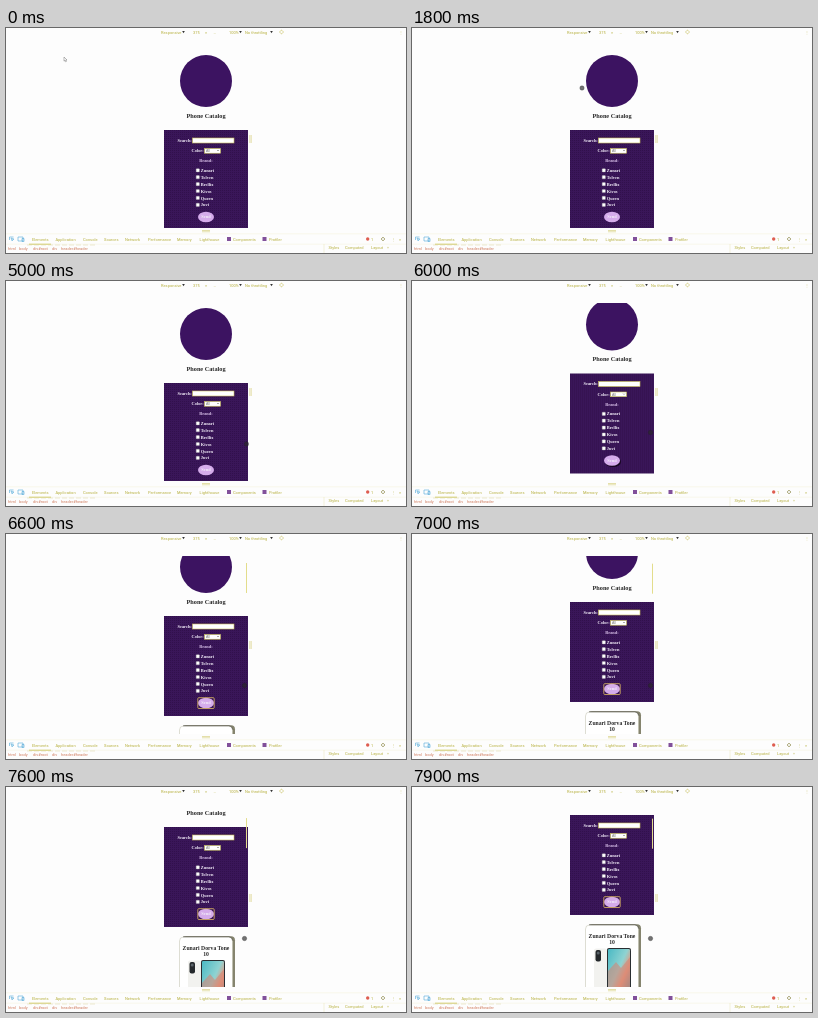
An HTML page for the animation above (8000 ms loop, 400 px wide and 225 px high).

```html
<!DOCTYPE html>
<html lang="en">
<head>
<meta charset="utf-8">
<title>Phone Catalog</title>
<style>
html, body { margin: 0; width: 100%; height: 100%; overflow: hidden; background: #fdfdfd }
svg { display: block; width: 100vw; height: 100vh }
text { white-space: pre }
.ui { font: 4px Roboto, Arial, sans-serif; fill: #b5ae3a }
.tag { fill: #cf7a5c }
.page { font: bold 4.4px "Liberation Serif", Times, serif; fill: #f4eefa }
.mid { text-anchor: middle }
.dark { fill: #292929 }
.h1 { font-size: 6.25px }
.h2 { font-size: 5.7px }
</style>
</head>
<body>
<svg viewBox="0 0 400 225">
  <defs>
    <clipPath id="view"><rect x="158" y="22" width="84" height="178"/></clipPath>
    <clipPath id="card"><rect x="173.5" y="212" width="53" height="90" rx="4"/></clipPath>
    <pattern id="grain" width="2" height="2" patternUnits="userSpaceOnUse">
      <rect width="2" height="2" fill="#3a1659"/><rect width="1" height="1" fill="#31104c"/>
    </pattern>
    <linearGradient id="screen" x2="1" y2="1">
      <stop stop-color="#4ab9c4"/><stop offset=".45" stop-color="#8fd3d2"/>
      <stop offset=".65" stop-color="#e59a80"/><stop offset="1" stop-color="#3a8fa5"/>
    </linearGradient>
  </defs>
  <g id="tools"></g>
  <g clip-path="url(#view)">
    <g id="page" class="page"></g>
    <path id="thumb" d="M240.5 28v30" stroke="#e3dd8c"/>
  </g>
  <path id="arrow" d="M-1-2v4.2l1-.9.7 1.5.7-.4-.7-1.4h1.3z" fill="#fff" stroke="#777" stroke-width=".5"/>
  <circle id="touch" r="2.2" fill="#292929" fill-opacity=".65" stroke="#222" stroke-opacity=".6" stroke-width=".5"/>
</svg>
<script>
const $ = id => document.getElementById(id);
const text = (x, y, s, cls = '') => `<text x="${x}" y="${y}" class="${cls}">${s}</text>`;
const box = (x, y, w, h, fill, more = '') =>
  `<rect x="${x}" y="${y}" width="${w}" height="${h}" fill="${fill}" ${more}/>`;
const row = (y, items, cls) => items.map(([x, s]) => text(x, y, s, cls)).join('');
const caret = x => `<path d="M${x - 1.3} 3h2.6l-1.3 2.3z" fill="#333"/>`;
const edge = 'stroke="#c5bd55" stroke-width=".6"';

$('tools').innerHTML =
  row(5.5, [[155, 'Responsive'], [187, '375'], [199, '×'], [207.5, '…'], [223, '100%'], [239, 'No throttling']], 'ui') +
  [177.5, 234.5, 265.5].map(caret).join('') +
  box(274, 2.5, 3, 3, 'none', edge + ' rx="1" transform="rotate(45 275.5 4)"') +
  text(393, 5.5, '⋮', 'ui') +
  `<path d="M243.8 107v8M245.2 107v8M196 202.5h8M196 203.8h8" stroke="#d3cc73" stroke-width=".6"/>` +
  `<path d="M0 205.8h400M0 216.2h400" stroke="#f3f1d9" stroke-width=".5"/>` +
  `<path d="M23 216.2h22" stroke="#c9c24b" stroke-width=".8"/>` +
  `<path d="M3.5 212v-3h4M5 210l3 1.2-1.4.4-.4 1.4zM12 209h5v4h-5zM16 210.5h2v3h-2z" fill="none" stroke="#52a9d8" stroke-width=".6"/>` +
  row(212.5, [[26, 'Elements'], [49.5, 'Application'], [77, 'Console'], [98, 'Sources'], [119, 'Network'],
    [142, 'Performance'], [171, 'Memory'], [193.5, 'Lighthouse'], [227, 'Components'], [263, 'Profiler'],
    [365, '1'], [385.5, '⋮'], [393, '×']], 'ui') +
  box(221, 209, 4, 4, '#81509a') + box(256.5, 209, 4, 4, '#81509a') +
  '<circle cx="361.7" cy="211" r="1.7" fill="#de5d50"/>' +
  '<circle cx="377" cy="211" r="1.5" fill="none" stroke="#87833f" stroke-width="1" stroke-dasharray=".8 .3"/>' +
  row(221.7, [[2, 'html'], [13, 'body'], [27, 'div#root'], [46, 'div'], [55, 'header#header']], 'ui tag') +
  row(221.3, [[322.5, 'Styles'], [339, 'Computed'], [365, 'Layout'], [381, '»']], 'ui') +
  `<path d="M21 217h69" stroke="#d9d3a1" stroke-width=".5" stroke-dasharray="5 2"/><path d="M318 216v9" stroke="#e6e0aa" stroke-width=".4"/>`;

const brands = ['Zunari', 'Tolven', 'Brellix', 'Kivos', 'Quern', 'Juvi'];
$('page').innerHTML =
  '<circle cx="200" cy="53" r="26" fill="#3c1361"/>' +
  text(200, 89.8, 'Phone Catalog', 'mid dark h1') +
  box(158, 102, 84, 100, 'url(#grain)') +
  text(171.5, 113.8, 'Search:') + box(186.5, 110, 41.5, 5, '#fff', edge) +
  text(185.5, 124.2, 'Color:') + box(198.5, 120.5, 16, 4.7, '#fff', edge) +
  '<text x="200" y="124.2" fill="#777" style="font:3.5px Arial,sans-serif">All</text>' +
  '<path d="M211 122l1 1 1-1" fill="none" stroke="#555" stroke-width=".5"/>' +
  '<g fill="#d8bfe8">' + text(200, 134.3, 'Brand:', 'mid') + '</g>' +
  brands.map((name, i) => box(190.2, 140.7 + i * 6.9, 3.2, 3.2, '#fff', 'rx=".5" stroke="#aaa" stroke-width=".4"') +
    text(194.8, 143.9 + i * 6.9, name)).join('') +
  '<ellipse id="shade" cx="201" cy="190.3" rx="8" ry="5.3" fill="#160620"/>' +
  '<ellipse cx="200" cy="189" rx="8" ry="5.2" fill="#d5aceb"/>' +
  text(200, 190.4, 'Send', 'mid') +
  `<rect id="focus" x="191.8" y="183.7" width="16.4" height="10.8" rx="1" fill="none" stroke="#e0bd62" stroke-width=".8"/>` +
  box(176, 211.3, 53, 90, '#85846e', 'rx="4"') +
  box(173.5, 212, 53, 90, '#fff', 'rx="4" stroke="#bdbca9" stroke-width=".5"') +
  '<path d="M177 211.8h46q3 0 4 4" fill="none" stroke="#3b3b34" stroke-width=".6"/>' +
  text(200, 225, 'Zunari Dorva Tone', 'mid dark h2') + text(200, 230.8, '10', 'mid dark h2') +
  '<g clip-path="url(#card)">' +
  box(182, 235.5, 13, 50, '#f2f2ef', 'rx="2"') + box(183.5, 237, 5.5, 11.5, '#24282b', 'rx="2"') +
  '<circle cx="186.2" cy="240" r="1.5" fill="#596268"/>' +
  box(195, 235, 24, 50, '#292e32', 'rx="2"') + box(196, 236, 22, 48, 'url(#screen)', 'rx="1.3"') +
  '<path d="M196 258l8-9 5 6 9-11v30h-22z" fill="#d98270" opacity=".55"/></g>';

// Each entry: [time from which it holds, values...]
const scroll = [[0, 0], [5400, 3], [5500, 7], [5600, 9.5], [6500, 14], [6600, 20], [6700, 24], [6800, 26],
  [7000, 34], [7100, 42], [7200, 49], [7300, 54.5], [7400, 57], [7600, 62], [7700, 68], [7800, 72], [7900, 74]];
const pointer = [[0, 59, 31], [1800, 170, 60], [1900, 277, 91], [2100, 320, 87], [2200, 369, 84], [2700, 101, 100],
  [3500, 76, 104], [3600, 55, 135], [3700, 41, 172], [3900, 120, 165], [4000, 200, 170], [4200, 215, 169],
  [4300, 230, 167], [4400, 241, 166], [4700, 240.5, 164.5], [4800, 240.5, 163], [5400, 239, 158],
  [5500, 238.5, 154], [5600, 238.5, 151.5]];
const at = (keys, t) => keys.findLast(k => k[0] <= t).slice(1);
const show = (id, on) => $(id).setAttribute('visibility', on ? 'visible' : 'hidden');

function draw(now) {
  const t = now % 8000;
  const [offset] = at(scroll, t), [x, y] = at(pointer, t);
  const inside = x >= 158 && x <= 242 && y >= 22 && y <= 200;
  $('page').setAttribute('transform', `translate(0 ${-offset})`);
  $('thumb').setAttribute('transform', `translate(0 ${offset * .05})`);
  for (const id of ['arrow', 'touch']) $(id).setAttribute('transform', `translate(${x} ${y})`);
  show('arrow', !inside);
  show('touch', inside);
  show('thumb', t >= 6500);
  show('shade', t >= 6000 && t < 6500);
  show('focus', t >= 6500);
}
const start = performance.now();
(function tick() {
  draw(performance.now() - start);
  requestAnimationFrame(tick);
})();
</script>
</body>
</html>
```
